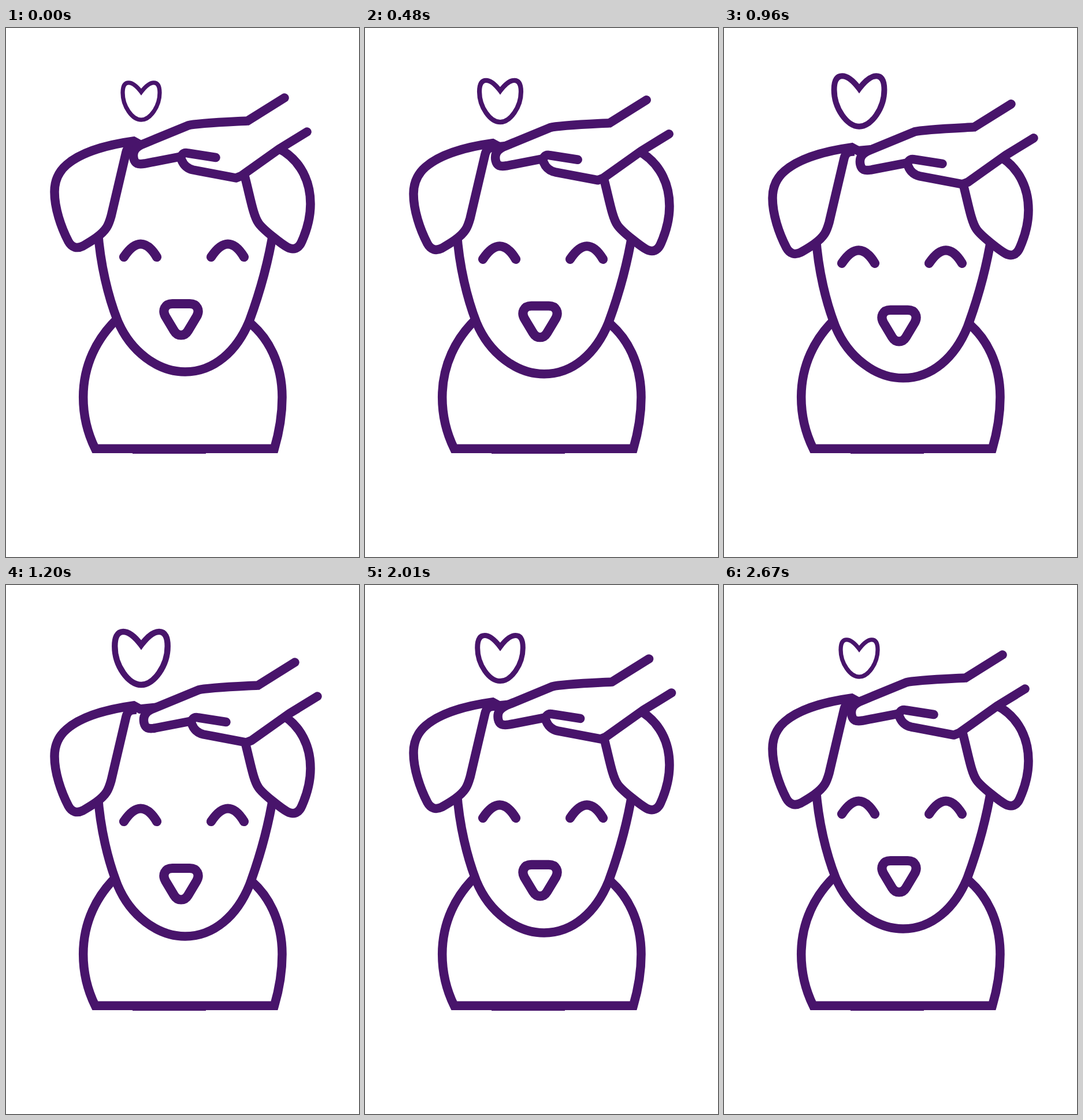
An HTML page for the animation above (2.7 s loop, 611 by 917 pixels).

```html
<!DOCTYPE html>
<html lang="en">
<head>
<meta charset="utf-8">
<title>Petting a dog</title>
<style>
  html, body { margin: 0; width: 100%; height: 100%; overflow: hidden; background: #fff; }
  svg { display: block; width: 100vw; height: 100vh; }
  path { fill: none; stroke: #48146b; stroke-width: 15.5; }
  .paper { fill: #fff; }
  .blank { fill: #fff; stroke: none; }
  .round { stroke-linecap: round; stroke-linejoin: round; }
  .bold { stroke-width: 16.2; }
  #heart { stroke-width: 10.4; stroke-miterlimit: 6; }
</style>
</head>
<body>
<svg viewBox="0 0 611 917">
  <path stroke-miterlimit="8" d="M205 493C153 536 133.700 590 133.700 640C133.700 672 141 702 154.300 729.200H464.500C473 700 478 672 478 640C478 588 458 534 410 502"/>
  <path d="M219 730.200H346"/>

  <g id="dog">
    <path class="paper" d="M159 350C163 410 177 466 193 507C215 560 262 596 310 596C360 596 400 560 421.500 507C438 462 454 407 463 350"/>
    <path class="paper" d="M300 198L262 199L232 202L221 196C181 201.500 132 213.500 105 237C91 249 84 264 84 284C84 312 95 345 108 370C114 381 123 383 133 378C145 371 165 360 174 346C178 340 180 333 182 326L208 215C210 207 214 203 226 203"/>
    <path class="paper" d="M470 208C500 222 527 255 527 305C527 330 520 352 512 370C507 382 498 386 487 380C478 375 445 350 437 338C428 325 423 295 414 260L411 248"/>
    <path class="round bold" d="M204 397C214 382 223 374.500 233 374.500S252 382 261 397"/>
    <path class="round bold" d="M355 397C365 382 374 374.500 384 374.500S403 382 412 397"/>
    <path class="bold" d="M288 478H318C331 478 336 489 330 500L315 525C309 535 297 535 291 525L276 500C270 489 275 478 288 478Z"/>
  </g>

  <g id="hand">
    <path class="blank" d="M482 121L418 161C380 163 330 165 315 169L235 202C222 208 219 216 221 226C223 235 228 237 240 235L302 223L304 229C308 239 315 244 324 246L398 260L474 210L521 180Z"/>
    <path stroke-linecap="round" d="M482 121L418 161C380 163 330 165 315 169L235 202C222 208 219 216 221 226C223 235 228 237 240 235L302 223"/>
    <path class="round" d="M363 224.500L315 217C306 215 301 222 304 229C308 239 315 244 324 246L398 260L407 256.500L473 209.500L521 180"/>
  </g>

  <path id="heart" d="M0 -23C-12 -39 -22 -46 -31 -46C-42 -46 -45.700 -35 -45.700 -21C-45.700 13 -22 46 0 46S45.700 13 45.700 -21C45.700 -35 42 -46 31 -46C22 -46 12 -39 0 -23Z"/>
</svg>
<script>
  const LOOP = 2700, STEP = 30;
  const [dog, hand, heart] = ["dog", "hand", "heart"].map(id => document.getElementById(id));

  const place = (el, x, y, scale = 1) =>
    el.setAttribute("transform", `translate(${x} ${y}) scale(${scale})`);

  function draw(ms) {
    const t = Math.floor((ms % LOOP) / STEP) * STEP;
    const p = (1 - Math.cos(2 * Math.PI * t / LOOP)) / 2;
    place(dog, 0, 13.4 * p);
    place(hand, 18.5 * p, 13.4 * p);
    place(heart, 234, 127, 0.7 + 0.31 * p);
  }

  let start;
  function tick(now) {
    start ??= now;
    draw(now - start);
    requestAnimationFrame(tick);
  }
  draw(0);
  requestAnimationFrame(tick);
</script>
</body>
</html>
```
